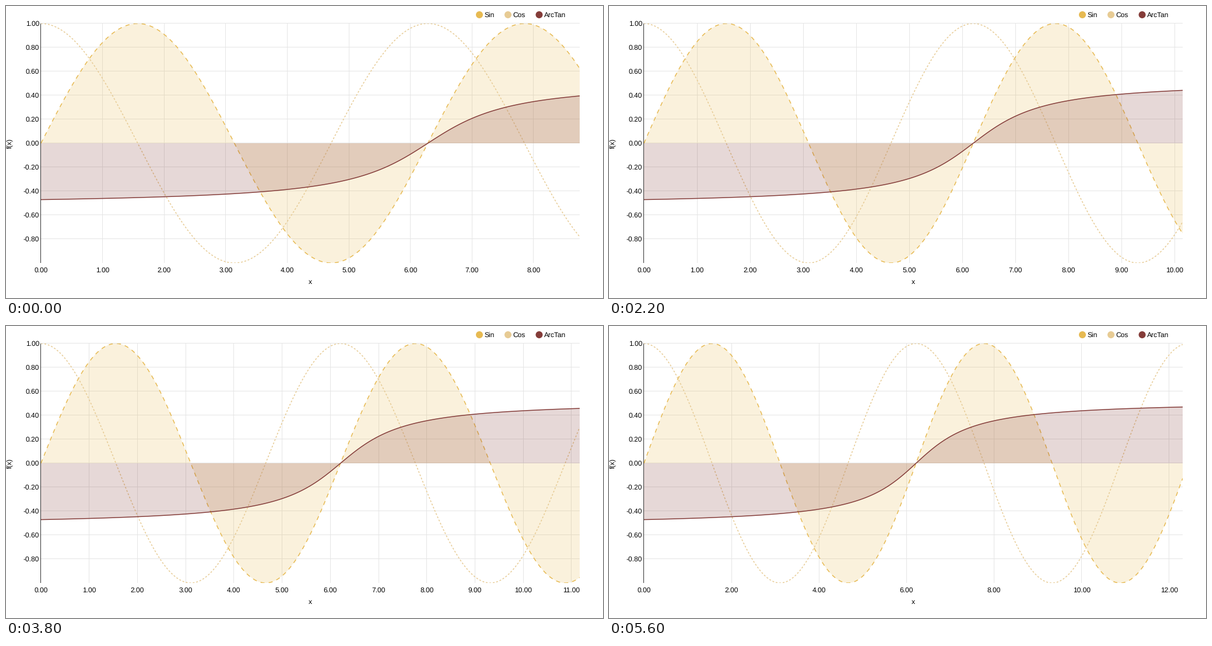
Recreate the animation shown at these times as a matplotlib script. Size 1024 by 500 pixels, loop 5800 ms.

```python
import numpy as np
import matplotlib.pyplot as plt
from matplotlib.animation import FuncAnimation
from matplotlib.collections import LineCollection
from matplotlib.patches import Circle, Polygon
from matplotlib.transforms import Bbox

W, H, DPI = 1024, 500, 100
PX = 72 / DPI                       # one pixel in points
LEFT, RIGHT, TOP, BOTTOM = 60, 984, 30, 440
FRAMES, INTERVAL = 29, 200
SPAN0, STEP = 8.75, 0.1273          # first x range and its growth per frame

SIN, COS, ATAN = "#e7ba52", "#e7cb94", "#843c39"
GRID, AXIS = "#e5e5e5", "#333333"

plt.rcParams["font.family"] = ["Liberation Sans", "DejaVu Sans"]
plt.rcParams["font.size"] = 12 * PX
plt.rcParams["text.hinting"] = "none"
plt.rcParams["path.simplify"] = False

fig = plt.figure(figsize=(W / DPI, H / DPI), dpi=DPI, facecolor="white")
ax = fig.add_axes([0, 0, 1, 1])
ax.set_xlim(0, W)
ax.set_ylim(H, 0)
ax.axis("off")
clip = Bbox([[LEFT, H - BOTTOM], [RIGHT, H - TOP]])


def to_y(v):
    return (TOP + BOTTOM) / 2 - v * (BOTTOM - TOP) / 2


def label(x, y, s, ha="center", **kw):
    return ax.text(x, y, s, ha=ha, va="baseline", color="black", zorder=9, **kw)


def rules(color, z, segments=()):
    """Crisp one-pixel lines, placed on pixel centres."""
    return ax.add_collection(LineCollection(segments, colors=color, linewidths=PX,
                                            zorder=z, snap=False, capstyle="butt"))


def dash(on, off, width=1.5):
    return (0, (on / width, off / width))


class Curve:
    def __init__(self, func, color, z, style="-", filled=True):
        self.func = func
        self.area = None
        if filled:
            self.area = ax.add_patch(Polygon([[0, 0], [1, 1], [1, 0]], facecolor=color,
                                             alpha=0.2, lw=0, zorder=z))
            self.area.set_clip_path(None)
            self.area.set_clip_box(clip)
        self.line, = ax.plot([], [], color=color, lw=1.5 * PX, ls=style,
                             dash_capstyle="butt", zorder=z + 0.5)
        self.line.set_clip_box(clip)

    def update(self, span):
        t = np.linspace(0, span, 1000)
        x = LEFT + t / span * (RIGHT - LEFT)
        y = to_y(self.func(t))
        self.line.set_data(x, y)
        if self.area:
            base = to_y(0)
            xs = np.r_[LEFT, x, RIGHT]
            ys = np.r_[base, y, base]
            self.area.set_xy(np.column_stack([xs, ys]))


# fixed horizontal grid with its labels
levels = np.arange(5, -5, -1) / 5
rules(GRID, 1, [[(LEFT, round(to_y(v)) - 0.5), (RIGHT, round(to_y(v)) - 0.5)]
                for v in levels])
for v in levels:
    label(57, to_y(v) + 4, f"{v:.2f}", ha="right")

columns = rules(GRID, 1)
x_labels = [label(0, 456, "") for _ in range(14)]
rules(AXIS, 2, [[(LEFT - 0.5, TOP), (LEFT - 0.5, BOTTOM)]])

label(521.8, 475.5, "x")
label(10.5, 235, "f(x)", rotation=90, rotation_mode="anchor")

for x, color, name in ((812, SIN, "Sin"), (861, COS, "Cos"), (914.5, ATAN, "ArcTan")):
    ax.add_patch(Circle((x, 15), 6, facecolor=color, lw=0, zorder=8))
    label(x + 8, 19, name, ha="left")

curves = [
    Curve(np.sin, SIN, 3, dash(7, 7)),
    Curve(np.cos, COS, 4, dash(3, 3), filled=False),
    Curve(lambda t: np.arctan(t - 2 * np.pi) / 3, ATAN, 5),
]


def span_at(k):
    # the data grows in samples of 0.01
    return round(SPAN0 + STEP * k, 2)


def update(k):
    # the axis trails the curves by one step once the data starts to grow
    span = span_at(k)
    for c in curves:
        c.update(span_at(k + 1) if k else span)

    gap = 2 if span > 12.25 else 1
    ticks = np.arange(0, span, gap)
    xs = LEFT + ticks / span * (RIGHT - LEFT)
    centres = np.floor(xs[1:]) + 0.5
    columns.set_segments([[(x, TOP), (x, BOTTOM)] for x in centres])
    for i, text in enumerate(x_labels):
        shown = i < len(ticks)
        text.set_visible(shown)
        if shown:
            text.set_x(xs[i])
            text.set_text(f"{ticks[i]:.2f}")
    return []


anim = FuncAnimation(fig, update, frames=FRAMES, interval=INTERVAL,
                     init_func=lambda: update(0), repeat=True, repeat_delay=0)
plt.show()
```
